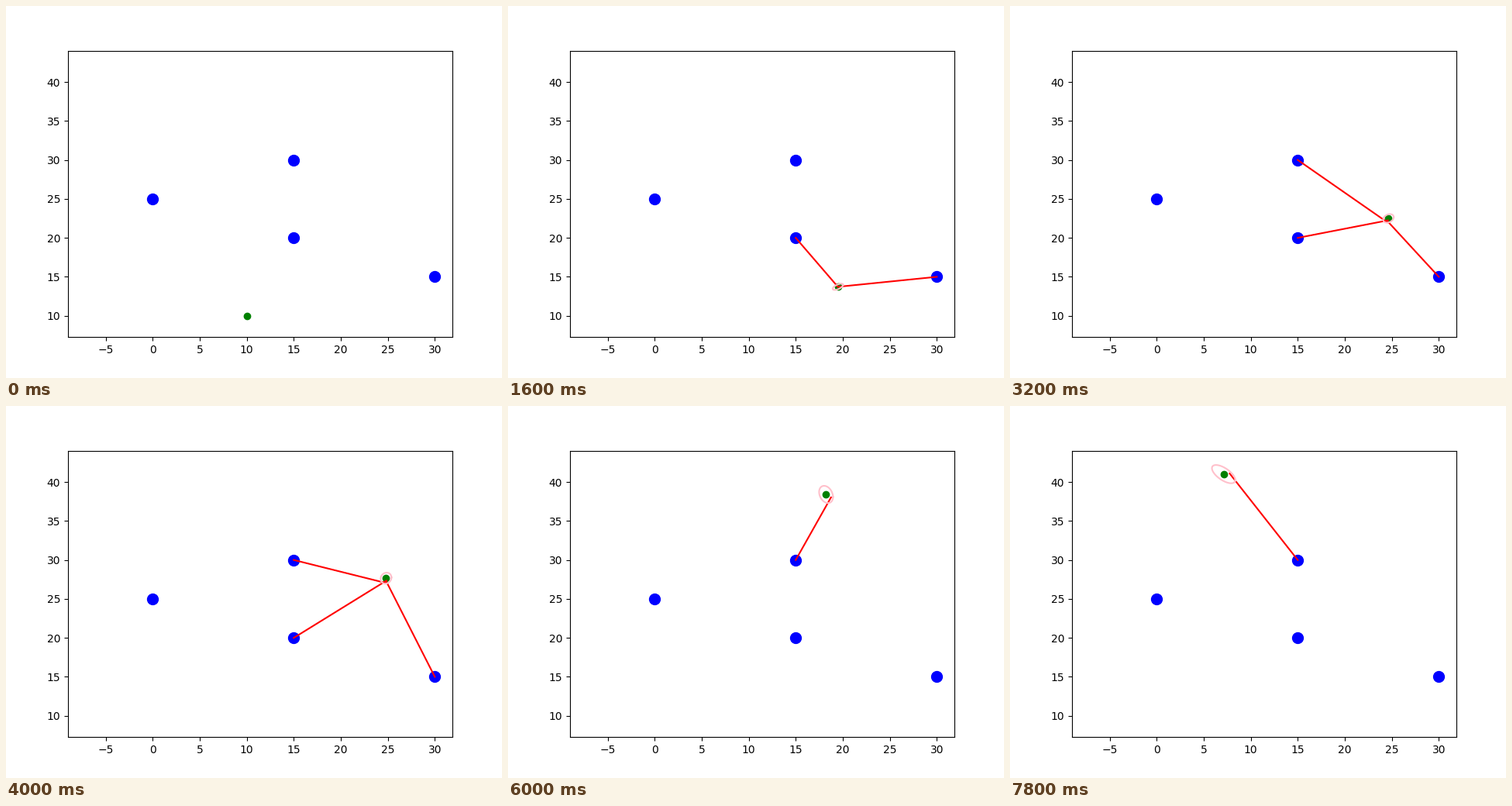
A matplotlib script that plays this animation: 640 by 480 pixels, repeating every 8 s.

```python
import numpy as np
import matplotlib.pyplot as plt
from matplotlib.animation import FuncAnimation

FRAMES, INTERVAL = 40, 200
XLIM, YLIM = (-9.0, 31.87), (7.265, 44.035)
PX, PY = 496 / (XLIM[1] - XLIM[0]), 369.6 / (YLIM[1] - YLIM[0])  # pixels per unit

LANDMARKS = np.array([(15, 30), (30, 15), (15, 20), (0, 25)])
SENSOR_RANGE = 15

# Robot drives on a circle at constant speed
CENTER, RADIUS, TURN = np.array([9.35, 25.58]), 15.6, np.radians(4.765)


def pose(t):
    a = (t + 0.5) * TURN
    return CENTER + RADIUS * np.array([np.sin(a), -np.cos(a)])


def ellipse(t):
    """Uncertainty outline: half extents in pixels, tilt set by the correlation."""
    half_w = 6.7 + 9.5 * (t / FRAMES) ** 5
    half_h = 8 - 4 * np.cos(np.pi * (t - 8) / 28)
    corr = 0.95 - 0.041 * t
    a = np.linspace(0, 2 * np.pi, 80)
    x, y = pose(t)
    return x + half_w / PX * np.cos(a), y + half_h / PY * np.cos(a - np.arccos(corr))


def sight(t, i):
    """Line from the lagging pose estimate to landmark i, empty when out of range."""
    mark = LANDMARKS[i]
    if t == 0 or np.hypot(*(mark - pose(t - 1))) >= SENSOR_RANGE:
        return [], []
    lag = np.clip((t - 8) / 20, 0, 0.5) * (1 - i / 4)  # each sighting corrects it
    return zip(pose(t - lag), mark)


fig = plt.figure(figsize=(6.4, 4.8), dpi=100)
ax = fig.add_subplot()
ax.set_xlim(*XLIM)
ax.set_ylim(*YLIM)
ax.plot(*LANDMARKS.T, "bo", ms=10, zorder=1)
robot = ax.scatter([10], [10], s=36, color="green", zorder=1.5)
lines = [ax.plot([], [], color="red", lw=1.5, zorder=2)[0] for _ in LANDMARKS]
ring, = ax.plot([], [], color="pink", lw=1.5, zorder=3)


def update(t):
    robot.set_offsets([pose(t)])
    ring.set_data(*(ellipse(t) if t else ([], [])))
    for i, line in enumerate(lines):
        line.set_data(*sight(t, i))
    return [robot, ring, *lines]


anim = FuncAnimation(fig, update, frames=FRAMES, interval=INTERVAL,
                     init_func=lambda: update(0), repeat=True, repeat_delay=0)
plt.show()
```
